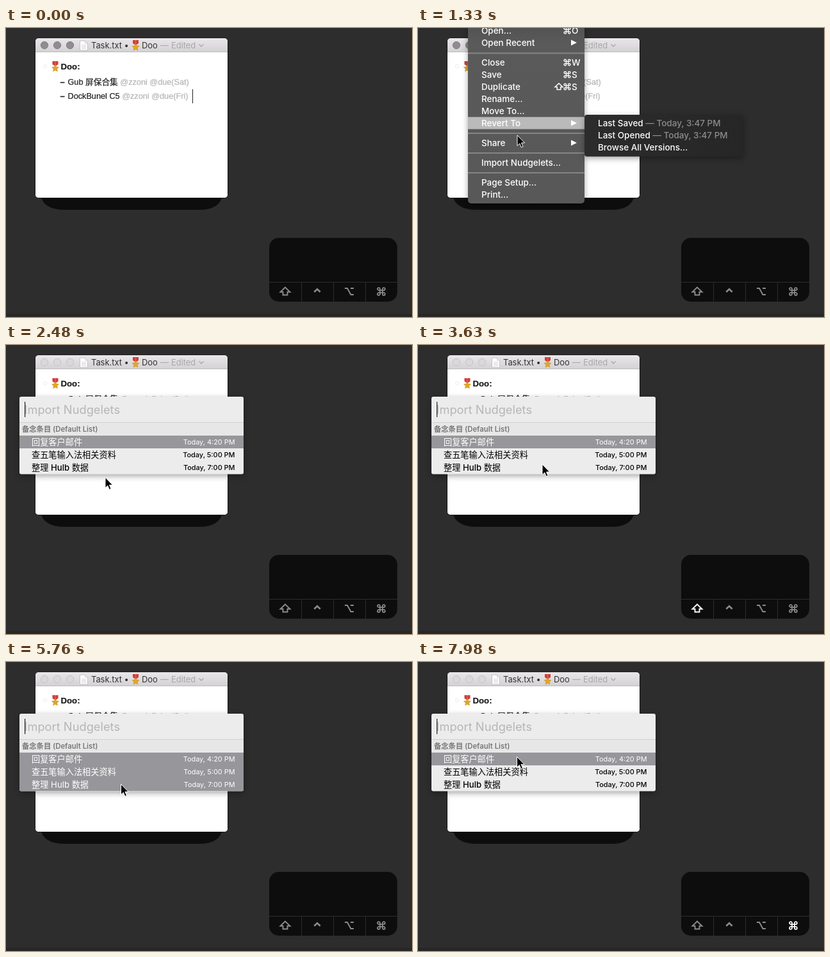
Recreate the animation shown at these times as an HTML page. Size 634 by 453 pixels, loop 8 s.

```html
<!DOCTYPE html>
<html lang="en">
<head>
<meta charset="utf-8">
<title>Task import</title>
<style>
  html, body { margin: 0; width: 634px; height: 453px; overflow: hidden; background: #2d2d2d; }
  svg { display: block; }
  text { font-family: Inter, "Noto Sans CJK SC", "Noto Sans CJK", sans-serif; white-space: pre; }
  .doc text { font: 12.7px "Liberation Sans", "Noto Sans CJK SC", "Noto Sans CJK", sans-serif; fill: #1c1c1c; stroke: #1c1c1c; stroke-width: .2; }
  .doc .bold { font-size: 13.2px; font-weight: 700; }
  .doc .tag { fill: #b3b3b3; stroke: #b3b3b3; }
  .title text { font-size: 12.9px; fill: #333; }
  .title .faint { fill: #a9a7a9; }
  .menu text { font-size: 13.5px; font-weight: 500; fill: #fff; }
  .menu .faint { fill: #8c8c8c; }
  .row text { font-size: 13.2px; font-weight: 500; fill: #000; }
  .row .when { font-size: 10.9px; text-anchor: end; }
  .row rect { fill: none; }
  .row.on rect { fill: #97969a; }
  .row.on text { fill: #fff; font-weight: 400; }
  .lights circle { fill: #8f8c8f; stroke: #868386; }
  .inactive .lights circle { fill: #dad8da; stroke: #c6c4c6; }
  .icon { fill: none; stroke: currentColor; stroke-width: 1.9; }
  .key { color: #8b8b8b; }
  .key.on { color: #fff; }
  .shade { filter: drop-shadow(0 3px 5px rgba(0, 0, 0, .35)); }
</style>
</head>
<body>
<svg width="634" height="453" viewBox="0 0 634 453">
  <defs>
    <linearGradient id="bar" x2="0" y2="1">
      <stop stop-color="#e9e7e9"/><stop offset="1" stop-color="#d3d1d3"/>
    </linearGradient>
    <linearGradient id="glass">
      <stop stop-color="#2c2c2c"/><stop offset="1" stop-color="#262626"/>
    </linearGradient>
    <linearGradient id="steel" x2="0" y2="1">
      <stop stop-color="#505050"/><stop offset=".12" stop-color="#5a5a5a"/><stop offset="1" stop-color="#585858"/>
    </linearGradient>
    <path id="shift" d="M0-6.5-7.5.7h4V5.5h7V.7h4z"/>
    <path id="ctrl" d="M-4.7.8 0-3.7 4.7.8" stroke-width="2.6"/>
    <path id="opt" d="M-7-5h4L2.5 5H7M2-5h5"/>
    <path id="cmd" transform="scale(.66) translate(-12 -12)" stroke-width="2.6"
      d="M15 6v12a3 3 0 1 0 3-3H6a3 3 0 1 0 3 3V6a3 3 0 1 0-3 3h12a3 3 0 1 0-3-3z"/>
    <g id="medal">
      <path d="M-4.5-8H4.500V-3L0 0-4.500-3z" fill="#dc3a2c"/>
      <path d="M-.8-8H.8V-1H-.8z" fill="#8a78b0"/>
      <path d="M0-2.500 1.500.8 5.500 1.500 2.700 4.200 3.400 8 0 6.300-3.400 8-2.700 4.200-5.500 1.500-1.500.8z" fill="#e3a622" stroke="#c08a1c" stroke-width=".5"/>
    </g>
  </defs>

  <rect width="634" height="453" fill="#2d2d2d"/>
  <rect y="448" width="634" height="5" fill="#292626"/>

  <g id="win">
    <path d="M54 262H338Q334 285 302 285H92Q58 285 54 262z" fill="#0d0d0d"/>
    <rect x="45.5" y="16" width="301" height="250.5" rx="5" fill="#fff" stroke="#151515"/>
    <path d="M46 38V21a5 5 0 0 1 5-5H341a5 5 0 0 1 5 5V38z" fill="url(#bar)"/>
    <path d="M46 37.5H346" stroke="#bebcbe"/>
    <g class="lights">
      <circle cx="60" cy="27" r="5.7"/><circle cx="80" cy="27" r="5.7"/><circle cx="100" cy="27" r="5.7"/>
    </g>
    <g class="title">
      <path d="M115.5 20H123.5L127.5 24V35H115.5z" fill="#fff" stroke="#c4c2c4"/>
      <path d="M123.5 20V24H127.5M118 27h7M118 29.5h7M118 32h7" fill="none" stroke="#cfcfcf"/>
      <text x="133" y="31.7">Task.txt •</text>
      <use href="#medal" x="202.5" y="27"/>
      <text x="212" y="31.7">Doo</text>
      <text x="241" y="31.7" class="faint">—</text>
      <text x="258" y="31.7" class="faint">Edited</text>
      <path d="M301.5 25.5 305 29l3.500-3.500" fill="none" stroke="#a9a7a9" stroke-width="1.4"/>
    </g>
    <g class="doc">
      <circle cx="61" cy="60" r="2.6" fill="none" stroke="#eee"/>
      <use href="#medal" x="77" y="60"/>
      <text x="85.5" y="65" class="bold">Doo:</text>
      <text x="84.5" y="88.5" class="bold">–</text>
      <text x="96.5" y="88.5">Gub 屏保合集 <tspan class="tag">@zzoni @due(Sat)</tspan></text>
      <text x="84.5" y="110.5" class="bold">–</text>
      <text x="96.5" y="110.5">DockBunel C5 <tspan class="tag">@zzoni @due(Fri)</tspan></text>
      <rect id="docCaret" x="291" y="96" width="1" height="22" fill="#222"/>
    </g>
  </g>

  <g id="menu" class="menu">
    <g class="shade">
      <rect x="78" y="-10" width="182" height="285" rx="5" fill="url(#steel)"/>
    </g>
    <path d="M78 39.5H260M78 165H260M78 196H260M78 227H260" stroke="#858585" stroke-width="2"/>
    <rect id="hover" x="78" width="182" height="19" fill="#bababa"/>
    <g id="items" color="#fff"></g>
  </g>

  <g id="submenu" class="menu">
    <rect class="shade" x="260" y="136" width="248" height="65.5" rx="4" fill="url(#glass)"/>
    <text x="281" y="154">Last Saved <tspan class="faint">— Today, 3:47 PM</tspan></text>
    <text x="281" y="173">Last Opened <tspan class="faint">— Today, 3:47 PM</tspan></text>
    <text x="281" y="192">Browse All Versions…</text>
  </g>

  <g id="panel">
    <rect class="shade" x="21" y="81" width="350" height="121.5" rx="3" fill="#ececec"/>
    <path d="M21 121.5H371" stroke="#cfcfcf"/>
    <rect x="21" y="122" width="350" height="20" fill="#e7e7e7"/>
    <text x="28.5" y="108" font-size="18.3" fill="#b6b6b6">Import Nudgelets</text>
    <rect id="caret" x="29" y="89" width="1.2" height="24" fill="#222"/>
    <text x="25" y="135.8" font-size="11.3" font-weight="600" fill="#777">备念条目 (Default List)</text>
    <g id="rows"></g>
  </g>

  <rect x="411" y="329" width="200" height="100" rx="15" fill="#0d0d0d"/>
  <path d="M411 398.5H611M461.5 398V429M511.5 398V429M561.5 398V429" stroke="#2d2d2d"/>
  <g id="keys"></g>

  <path id="cursor" d="M0 0V16.5L3.800 13 6.300 19 9 17.900 6.500 12H11.600z" fill="#000" stroke="#fff"/>
</svg>

<script>
const LOOP = 8000, TICK = 88.6;
const $ = id => document.getElementById(id);

// Menu entries: centre line, label, shortcut ("+" adds shift, ">" opens a submenu)
const MENU = [
  [4, 'Open…', 'O'], [23, 'Open Recent', '>'], [54, 'Close', 'W'], [73, 'Save', 'S'],
  [92, 'Duplicate', '+S'], [111, 'Rename…'], [130, 'Move To…'], [149, 'Revert To', '>'],
  [180, 'Share', '>'], [211, 'Import Nudgelets…'], [242, 'Page Setup…'], [261, 'Print…']
];
const REVERT = 149;

// Each row is selected from its first tick up to its second
const TASKS = [
  ['回复客户邮件', '4:20', 0, 99],
  ['查五笔输入法相关资料', '5:00', 50, 86],
  ['整理 Hulb 数据', '7:00', 54, 79]
];
const KEYS = [['shift', 37, 58], ['ctrl', 99, 99], ['opt', 99, 99], ['cmd', 75, 99]];

// Pointer path: tick, x, y
const PATH = [
  [10, 144, -40], [11, 146, 2], [14, 155, 142], [15, 155, 168], [18, 155, 196], [20, 155, 207.5],
  [36, 155, 207.5], [41, 194, 187], [43, 194, 187], [48, 104, 169], [49, 98.5, 171.5], [50, 98.5, 171.5],
  [54, 120, 191.5], [55, 120, 191.5], [60, 179.5, 191.5], [71, 179.5, 191.5], [72, 176, 191.5],
  [76, 176, 191.5], [78, 169, 190], [82, 169, 190], [86, 166, 171], [87, 166, 171], [90, 154.5, 148.5]
];
const BLINKS = [28, 34, 40, 46, 53, 59, 65, 71, 77, 83, 89];
const MENU_FADE = { 24: .36, 25: .16 };

const icon = (name, x, y, k = 1) =>
  `<use href="#${name}" class="icon" transform="translate(${x} ${y}) scale(${k})"/>`;

function shortcut(y, s) {
  if (!s) return '';
  if (s === '>') return `<path d="M239 ${y - 4.5}l9 4.5-9 4.5z" fill="#fff"/>`;
  return (s.length > 1 ? icon('shift', 220, y, .8) : '') + icon('cmd', 233, y, .82) +
    `<text x="240" y="${y + 5}">${s.at(-1)}</text>`;
}

$('items').innerHTML = MENU.map(([y, label, s]) =>
  `<text x="99" y="${y + 5}">${label}</text>${shortcut(y, s)}`).join('');

$('rows').innerHTML = TASKS.map(([label, time], i) => {
  const y = 142 + 20 * i;
  return `<g class="row"><rect x="21" y="${y}" width="350" height="20"/>
    <text x="40" y="${y + 14.8}">${label}</text>
    <text class="when" x="357.5" y="${y + 13.8}">Today, ${time} PM</text></g>`;
}).join('');

$('keys').innerHTML = KEYS.map(([name], i) =>
  `<g class="key">${icon(name, 436 + 50 * i, 413)}</g>`).join('');

function pointer(n) {
  const i = PATH.findIndex(p => p[0] > n);
  if (i === 0) return PATH[0].slice(1);
  if (i < 0) return PATH.at(-1).slice(1);
  const [a, ax, ay] = PATH[i - 1], [b, bx, by] = PATH[i];
  const k = (n - a) / (b - a);
  return [ax + (bx - ax) * k, ay + (by - ay) * k];
}

const within = (n, a, b) => n >= a && n < b;
const show = (id, alpha) => $(id).setAttribute('opacity', Number(alpha));
const mark = (list, specs, n) => [...list].forEach((el, i) =>
  el.classList.toggle('on', within(n, ...specs[i].slice(-2))));

function draw(t) {
  const n = Math.floor((t + 12) / TICK);
  const [x, y] = pointer(n);
  $('cursor').setAttribute('transform', `translate(${x} ${y})`);

  // Separators keep the entry above them highlighted
  const hot = MENU.filter(m => m[0] - 9.5 <= y).at(-1)?.[0] ?? 0;
  $('hover').setAttribute('y', hot - 9.5);
  show('menu', within(n, 6, 26) ? MENU_FADE[n] ?? 1 : 0);
  show('hover', hot > 0 && n !== 22);
  show('submenu', hot === REVERT && n === 15);

  show('docCaret', n < 2);
  show('panel', n < 27 ? 0 : n < 28 ? .5 : 1);
  show('caret', BLINKS.filter(b => b <= n).length % 2);
  $('win').classList.toggle('inactive', n >= 27);
  mark($('rows').children, TASKS, n);
  mark($('keys').children, KEYS, n);
}

const start = performance.now();
function frame() {
  draw((performance.now() - start) % LOOP);
  requestAnimationFrame(frame);
}
frame();
</script>
</body>
</html>
```
